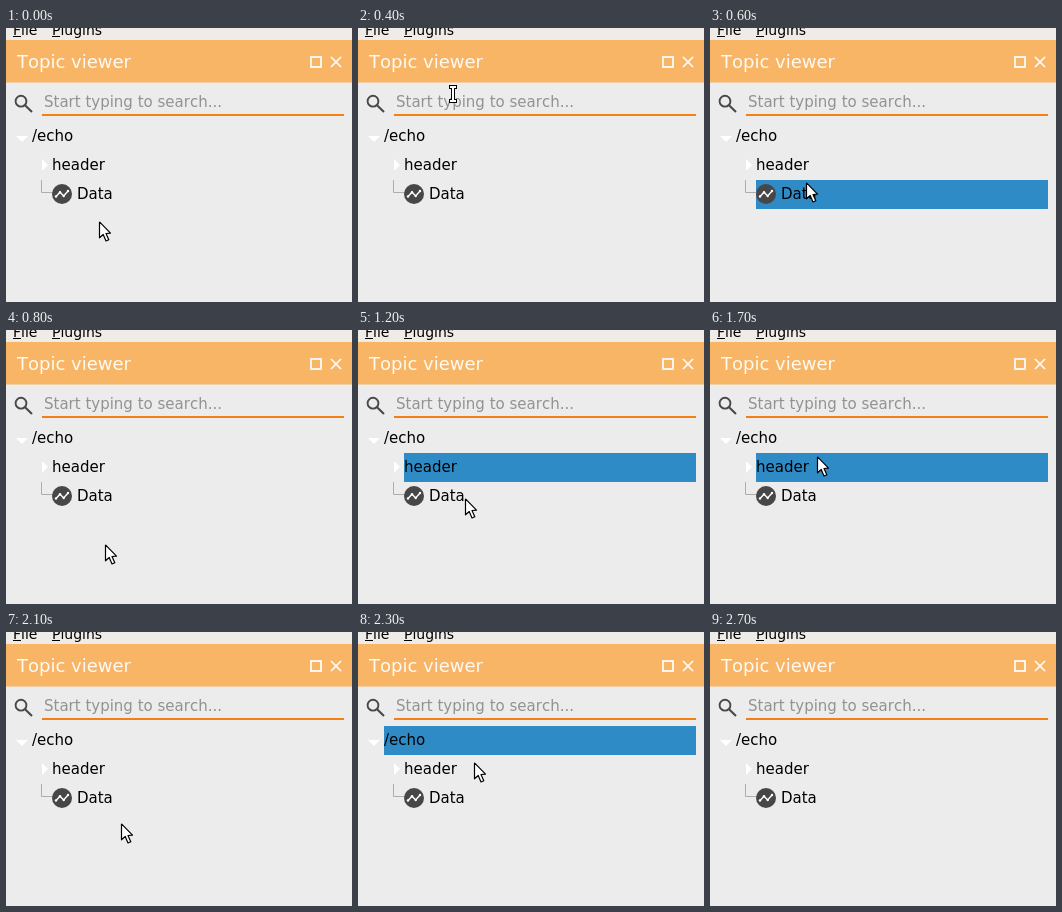
An HTML page with a canvas that plays this animation: 346x274 px, repeating every 3 s.

```html
<!DOCTYPE html>
<html lang="en">
<head>
<meta charset="utf-8">
<title>Topic viewer</title>
<style>
html, body { margin: 0; width: 100%; height: 100%; overflow: hidden; background: #ececec; }
canvas { display: block; }
</style>
</head>
<body>
<canvas id="stage" width="346" height="274"></canvas>
<script>
const ctx = document.getElementById('stage').getContext('2d', { alpha: false });
const LOOP = 3000, STEP = 100, LEAD = 50;
const ROW_TOP = 94, ROW_H = 29;

// Turning points of the pointer: time, x, y
const turns = [
  [150, 93, 193], [400, 95, 66], [700, 97, 198], [950, 102, 237], [1200, 107, 168],
  [1400, 106, 93], [1550, 106, 93], [1700, 107, 126], [2000, 115, 191],
  [2150, 115, 191], [2700, 120, -31]
];

function pointerAt(t) {
  const next = turns.findIndex(p => p[0] > t);
  if (next <= 0) return turns.at(next).slice(1);
  const [t0, x0, y0] = turns[next - 1], [t1, x1, y1] = turns[next];
  const u = (t - t0) / (t1 - t0);
  return [Math.round(x0 + (x1 - x0) * u), Math.round(y0 + (y1 - y0) * u)];
}

function text(str, x, y, size, color) {
  ctx.font = size + 'px "DejaVu Sans", sans-serif';
  ctx.fontKerning = 'none';
  ctx.fillStyle = color;
  ctx.fillText(str, x, y);
}

function rect(x, y, w, h, color) {
  ctx.fillStyle = color;
  ctx.fillRect(x, y, w, h);
}

function trace(points) {
  ctx.beginPath();
  points.forEach(([x, y]) => ctx.lineTo(x, y));
}

function fill(points, color) {
  trace(points);
  ctx.fillStyle = color;
  ctx.fill();
}

function stroke(points, color, width) {
  trace(points);
  ctx.strokeStyle = color;
  ctx.lineWidth = width;
  ctx.stroke();
}

function disc(x, y, r, color) {
  ctx.beginPath();
  ctx.arc(x, y, r, 0, Math.PI * 2);
  ctx.fillStyle = color;
  ctx.fill();
}

function menu(label, x) {
  text(label, x, 7, 14, '#000');
  rect(x, 8, 8, 1, '#000');
}

function drawHeader() {
  rect(0, 0, 346, 12, '#efebe7');
  menu('File', 7);
  menu('Plugins', 46);

  rect(0, 12, 346, 42.5, '#f8b565');
  text('Topic viewer', 11, 40, 18, '#fffaf3');
  ctx.strokeStyle = '#fff';
  ctx.lineWidth = 1.7;
  ctx.strokeRect(305, 29, 10, 10);
  stroke([[325, 29], [335, 39]], '#fff', 1.6);
  stroke([[335, 29], [325, 39]], '#fff', 1.6);
}

function drawSearch() {
  ctx.beginPath();
  ctx.arc(15, 73.2, 5.4, 0, Math.PI * 2);
  ctx.strokeStyle = '#484848';
  ctx.lineWidth = 1.9;
  ctx.stroke();
  stroke([[18.8, 77], [26, 84]], '#484848', 2.1);
  text('Start typing to search...', 38, 79, 15, '#929292');
  rect(36, 86, 302, 2, '#f57f17');
}

function drawTree(row) {
  if (row >= 0 && row < 3) {
    const x = row ? 46 : 26;
    rect(x, ROW_TOP + row * ROW_H, 338 - x, ROW_H, '#2e8bc6');
  }
  fill([[10, 108], [22, 108], [16, 114]], '#fff');
  fill([[36, 131], [42, 137], [36, 143]], '#fff');
  stroke([[35.5, 152], [35.5, 164.5], [47, 164.5]], '#adadad', 1);

  disc(56, 166, 10, '#474747');
  const chart = [[50, 168.5], [54, 164.3], [57.7, 168], [62, 163]];
  stroke(chart, '#fff', 1.4);
  chart.forEach(([x, y]) => disc(x, y, 1.2, '#fff'));

  text('/echo', 26, 113, 15, '#000');
  text('header', 46, 142, 15, '#000');
  text('Data', 71, 171, 15, '#000');
}

function drawArrow(x, y) {
  ctx.save();
  ctx.translate(x + 0.5, y + 0.8);
  const shape = [[0, 0], [0, 16], [3.7, 12.7], [6.5, 19.2], [9.3, 18], [6.5, 11.7], [11, 11.3], [0, 0]];
  fill(shape, '#fff');
  ctx.lineJoin = 'round';
  stroke(shape, '#000', 1.2);
  ctx.restore();
}

function drawBeam(x, y) {
  const layer = (grow, color) => {
    rect(x - 1 - grow, y - 8 - grow + 1, 2 + 2 * grow, 14 + 2 * grow, color);
    for (const top of [y - 8, y + 6]) {
      rect(x - 3 - grow, top - grow, 6 + 2 * grow, 2 + 2 * grow, color);
    }
  };
  layer(1, '#000');
  layer(0, '#fff');
}

function draw(time) {
  const t = Math.floor(time % LOOP / STEP) * STEP;
  const [x, y] = pointerAt(t);
  const [, hoverY] = pointerAt(t + LEAD);

  rect(0, 0, 346, 274, '#ececec');
  drawHeader();
  drawSearch();
  drawTree(Math.floor((hoverY - ROW_TOP) / ROW_H));
  if (y > 57 && y < 88) drawBeam(x, y);
  else drawArrow(x, y);
}

const start = performance.now();
function tick() {
  draw(performance.now() - start);
  requestAnimationFrame(tick);
}
tick();
</script>
</body>
</html>
```
